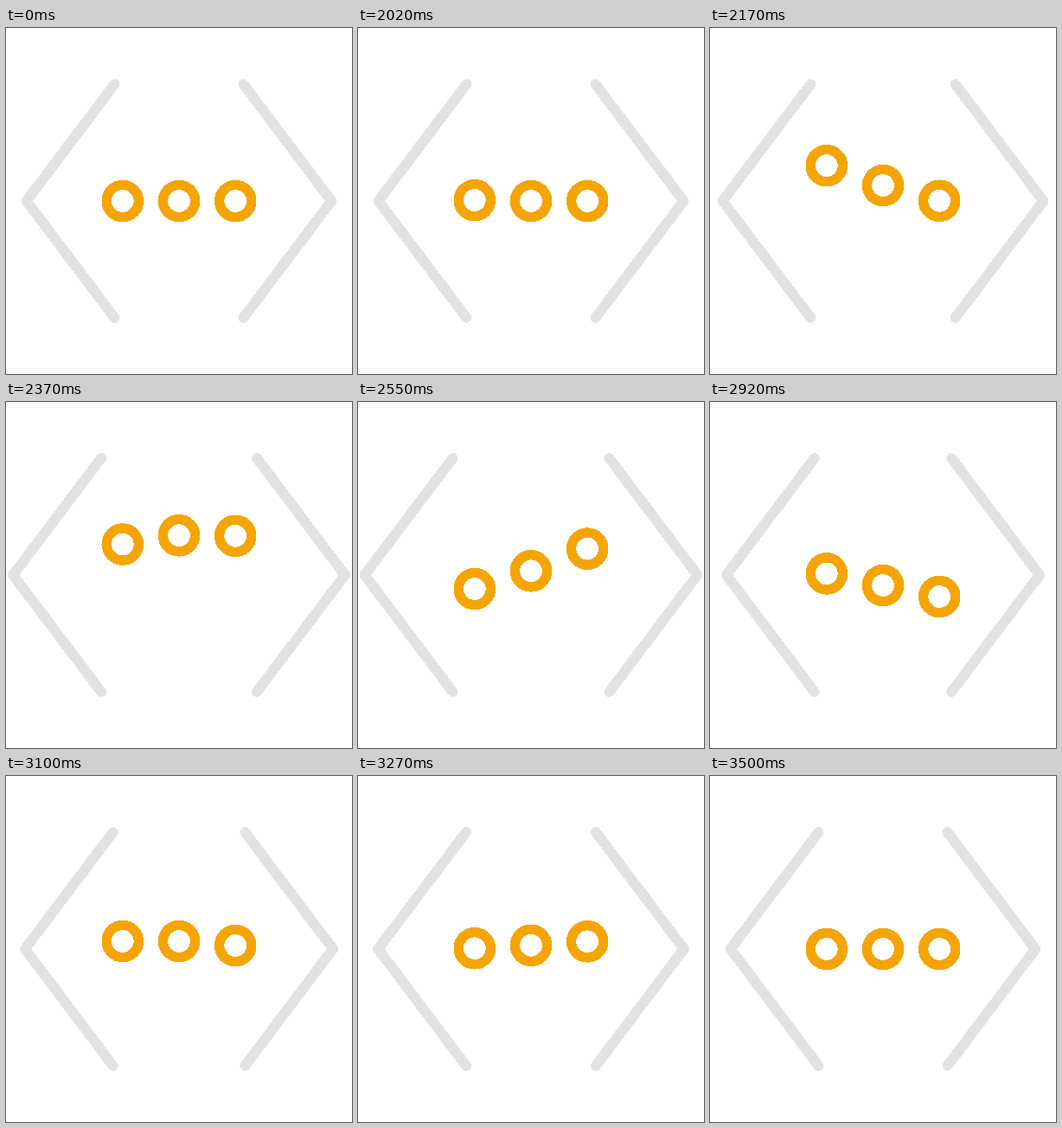
Write an HTML page that moves like this. It is 400 px wide and 400 px high and loops after 3.52 s.

```html
<!DOCTYPE html>
<html lang="en">
<head>
<meta charset="utf-8">
<title>Code brackets</title>
<style>
  html, body { margin: 0; width: 100%; height: 100%; overflow: hidden; background: #fff; }
  svg { display: block; width: 100%; height: 100%; shape-rendering: crispEdges; }
  g { fill: none; stroke-linecap: round; stroke-linejoin: round; }
</style>
</head>
<body>
<svg viewBox="0 0 400 400">
  <g stroke="#e2e2e2" stroke-width="11.8">
    <path id="left" d="M125.5 65 23.7 200 125.5 335"/>
    <path id="right" d="M274.5 65 376.3 200 274.5 335"/>
  </g>
  <g stroke="#f5a503" stroke-width="11.4">
    <circle class="dot" cx="134.8" cy="200" r="18.6"/>
    <circle class="dot" cx="200" cy="200" r="18.6"/>
    <circle class="dot" cx="265.2" cy="200" r="18.6"/>
  </g>
</svg>
<script>
const LOOP = 3520, START = 2000, STAGGER = 80;

// Ease like cubic-bezier(x1, 0, x2, 1), solved by bisection.
function bezier(x1, x2) {
  return x => {
    let low = 0, high = 1, u;
    for (let i = 0; i < 20; i++) {
      u = (low + high) / 2;
      const w = 1 - u;
      if (3 * u * w * (w * x1 + u * x2) + u ** 3 < x) low = u;
      else high = u;
    }
    return u * u * (3 - 2 * u);
  };
}

// Eases between [time, value] keys and holds the first and last value.
function track(ease, ...keys) {
  return t => {
    const next = keys.findIndex(([time]) => time > t);
    if (next === 0) return keys[0][1];
    if (next < 0) return keys[keys.length - 1][1];
    const [t0, v0] = keys[next - 1], [t1, v1] = keys[next];
    return v0 + (v1 - v0) * ease((t - t0) / (t1 - t0));
  };
}

const spread = track(bezier(0.33, 0.17), [0, 0], [500, 16.2], [1500, 0]);
const bounce = track(bezier(0.38, 0.45),
  [0, 0], [240, -46], [275, -46], [695, 28.3], [1060, -9.5], [1340, 0]);

const left = document.getElementById("left");
const right = document.getElementById("right");
const dots = document.querySelectorAll(".dot");

function draw() {
  const t = performance.now() % LOOP - START;
  const x = spread(t);
  left.setAttribute("transform", `translate(${-x})`);
  right.setAttribute("transform", `translate(${x})`);
  dots.forEach((dot, i) => dot.setAttribute("cy", 200 + bounce(t - i * STAGGER)));
  requestAnimationFrame(draw);
}
draw();
</script>
</body>
</html>
```
